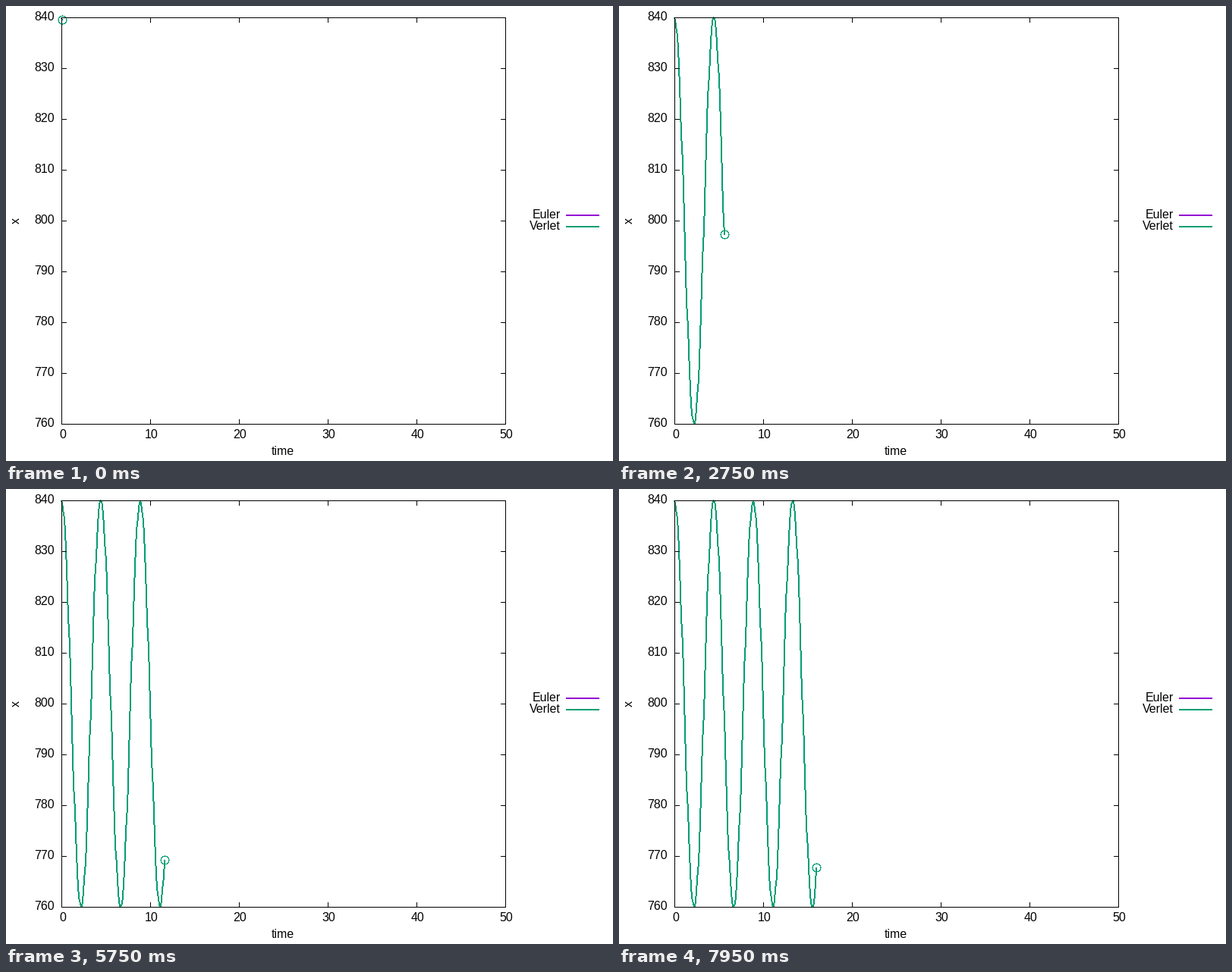
These frames come from a looping animation (800x600 px, 8000 ms). A matplotlib script:

```python
import math

import numpy as np
import matplotlib.pyplot as plt
from matplotlib.animation import FuncAnimation
from matplotlib.patches import PathPatch
from matplotlib.path import Path

W, H, DPI = 800, 600, 100
PX = 72 / DPI                       # one pixel in points
LEFT, RIGHT, TOP, BOTTOM = 73, 658, 15, 551
PURPLE, GREEN = "#9400d3", "#009e73"
FRAMES, STEP = 160, 0.1
OMEGA = math.sqrt(2)

plt.rcParams["font.family"] = "Liberation Sans"
plt.rcParams["text.hinting"] = "default"

fig = plt.figure(figsize=(W / DPI, H / DPI), dpi=DPI, facecolor="white")
ax = fig.add_axes([0, 0, 1, 1])
ax.set_xlim(0, W)
ax.set_ylim(H, 0)
ax.axis("off")


def label(x, y, text, ha="center", **kw):
    ax.text(x, y, text, ha=ha, va="baseline", fontsize=16 * PX, **kw)


def rect_path(rects):
    """One path made of (x0, y0, x1, y1) rectangles."""
    x0, y0, x1, y1 = np.asarray(rects, float).T
    corners = [(x0, y0), (x1, y0), (x1, y1), (x0, y1), (x0, y0)]
    verts = np.array(corners).transpose(2, 0, 1).reshape(-1, 2)
    codes = [Path.MOVETO] + [Path.LINETO] * 3 + [Path.CLOSEPOLY]
    return Path(verts, np.tile(codes, len(x0)))


def fill(rects, color="black", z=5):
    patch = PathPatch(rect_path(rects), facecolor=color, edgecolor="none",
                      linewidth=0, snap=False, zorder=z)
    return ax.add_patch(patch)


def to_pixels(t):
    """Whole-pixel position of the oscillator at time t."""
    x = 800 + 40 * np.cos(OMEGA * t)
    px = LEFT + t * (RIGHT - LEFT) / 50
    py = BOTTOM - (x - 760) * (BOTTOM - TOP) / 80
    return np.floor(px + 0.5), np.floor(py + 0.5)


def stroke(xa, ya, xb, yb):
    """Stepped line, two pixels wide across its steeper direction."""
    dx, dy = abs(xb - xa), abs(yb - ya)
    n = int(max(dx, dy)) + 1
    x = np.floor(np.linspace(xa, xb, n) + 0.5)
    y = np.floor(np.linspace(ya, yb, n) + 0.5)
    if dy > dx:
        return np.column_stack([x - 1, y, x + 1, y + 1])
    return np.column_stack([x, y - 1, x + 1, y + 1])


# border
for y in (TOP, BOTTOM):
    fill([(LEFT, y, RIGHT + 1, y + 1)])
for x in (LEFT, RIGHT):
    fill([(x, TOP, x + 1, BOTTOM + 1)])

# tics and their labels
for k in range(9):
    y = BOTTOM - 67 * k
    fill([(LEFT, y, LEFT + 7, y + 1), (RIGHT - 6, y, RIGHT + 1, y + 1)])
    label(64, y + 4, str(760 + 10 * k), ha="right")
for k in range(6):
    x = LEFT + 117 * k
    fill([(x, TOP, x + 1, TOP + 7), (x, BOTTOM - 6, x + 1, BOTTOM + 1)])
    label(x + 1.5, 570, str(10 * k))

label(365, 592, "time")
label(18, 283, "x", rotation=90, rotation_mode="anchor")

# key
for name, y, color in (("Euler", 276, PURPLE), ("Verlet", 291, GREEN)):
    label(731, y + 4, name, ha="right")
    fill([(738, y - 1, 782, y + 1)], color)

# both solutions coincide, so only the upper curve shows
px, py = to_pixels(STEP * np.arange(FRAMES + 1))
strokes = [stroke(px[i], py[i], px[i + 1], py[i + 1]) for i in range(FRAMES)]

# marker: a ring of single pixels, radius 6
angles = np.radians(np.arange(360))
ring = np.trunc(6 * np.column_stack([np.cos(angles), np.sin(angles)]))
ring = np.unique(ring + 0.0, axis=0)
ring = np.hstack([ring, ring + 1])

curve = fill(strokes[0], GREEN, 3)
marker = fill(ring, GREEN, 4)


def update(n):
    curve.set_path(rect_path(np.vstack(strokes[:n + 1])))
    marker.set_path(rect_path(ring + np.tile([px[n + 1], py[n + 1]], 2)))
    return curve, marker


anim = FuncAnimation(fig, update, frames=FRAMES, interval=50,
                     repeat=True, repeat_delay=0)
plt.show()
```
